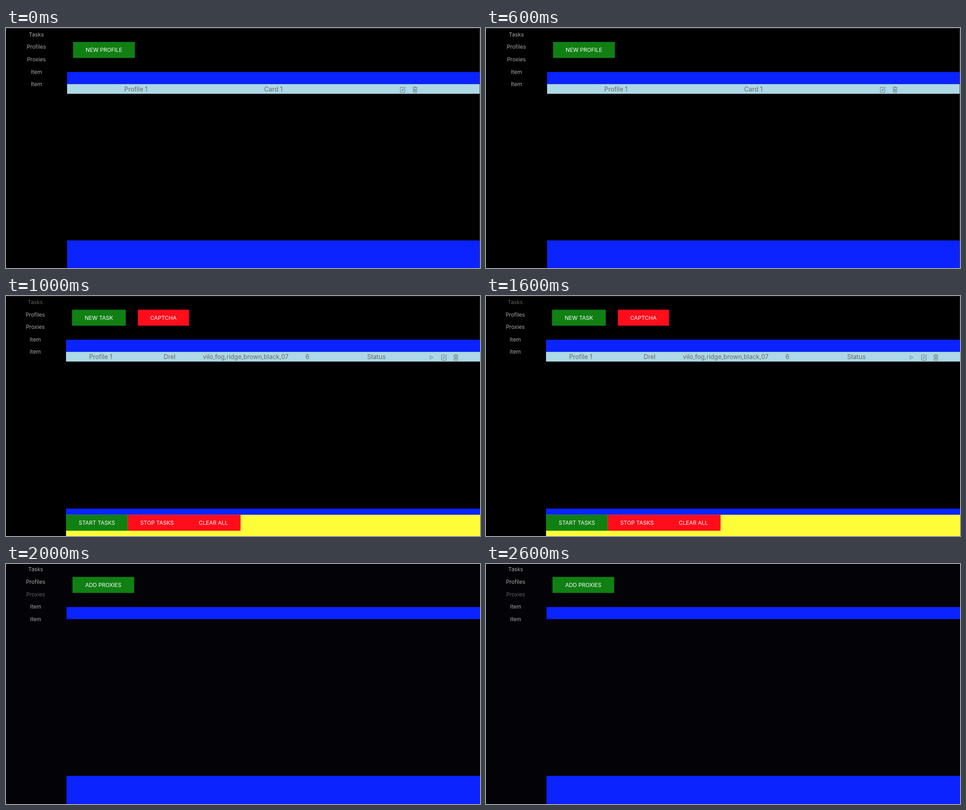
An HTML page that plays this animation: 1050x533 px, repeating every 3000 ms.

```html
<!DOCTYPE html>
<html lang="en">
<head>
<meta charset="utf-8">
<title>Task manager</title>
<style>
  html, body { margin: 0; width: 100%; height: 100%; overflow: hidden; background: #000; }
  svg { display: block; width: 1050px; height: 533px; }
  text { font-family: Inter, "Open Sans", sans-serif; text-anchor: middle; }
  .nav { font-size: 12px; fill: #a9a9a9; }
  .nav .active { fill: #626262; }
  .label { font-size: 12.1px; fill: #fff; }
  .cell { font-size: 13.8px; fill: #666; }
  .blue { fill: #0a23ff; }
  .row { fill: #add8e6; }
  .green { fill: #108013; }
  .red { fill: #ff0d1b; }
  .yellow { fill: #fffc38; }
  .icon { fill: none; stroke: #6c777b; stroke-width: 1; stroke-linejoin: round; }
  .edge { fill: none; stroke: #4a4a4a; }

  #tasks { animation: tasks 3s step-end infinite; }
  #proxies { animation: proxies 3s step-end infinite; }
  @keyframes tasks {
    0%, 66.6667% { visibility: hidden; }
    33.3333% { visibility: visible; }
    100% { visibility: hidden; }
  }
  @keyframes proxies {
    0% { visibility: hidden; }
    66.6667%, 100% { visibility: visible; }
  }
</style>
</head>
<body>
<svg viewBox="0 0 1050 533">
  <defs>
    <g id="edit" class="icon">
      <path d="M8 1.5H.5V13H11V6"/>
      <path d="M4 9.5 4.8 6.8 10.6.8 12.3 2.4 6.5 8.6Z M5 7 6.4 8.4"/>
    </g>
    <g id="trash" class="icon">
      <path d="M0 2.5H11M3.5 2.5V.5H7.5V2.5M1.3 2.5 1.8 13.3H9.2L9.7 2.5M3.8 5V11M5.5 5V11M7.2 5V11"/>
    </g>
    <path id="play" class="icon" d="M.5.5V8L7 4.25Z"/>
  </defs>
  <g id="profiles"></g>
  <g id="tasks"></g>
  <g id="proxies"></g>
</svg>
<script>
  const rect = (cls, x, y, w, h) =>
    `<rect class="${cls}" x="${x}" y="${y}" width="${w}" height="${h}"/>`;
  const text = (cls, x, y, value) =>
    `<text class="${cls}" x="${x}" y="${y}">${value}</text>`;
  const icon = (name, x, y) => `<use href="#${name}" x="${x}" y="${y}"/>`;
  const button = (color, x, y, w, label) =>
    rect(color, x, y, w, 35.5) + text('label', x + w / 2, y + 22.2, label);
  const backdrop = color => `<rect width="1050" height="533" fill="${color}"/>`;

  const nav = (x, y, active) => '<g class="nav">' +
    ['Tasks', 'Profiles', 'Proxies', 'Item', 'Item'].map((item, i) =>
      text(i === active ? 'active' : '', x, y + i * 27.6, item)).join('') + '</g>';

  const show = (id, ...parts) => {
    document.getElementById(id).innerHTML = parts.join('');
  };

  show('profiles',
    backdrop('#000'),
    nav(67.3, 18.8),
    button('green', 148.5, 31, 137, 'NEW PROFILE'),
    rect('blue', 135.3, 97.7, 914, 27),
    rect('row', 135.3, 124.6, 914, 21.5),
    text('cell', 287.8, 140.5, 'Profile 1'),
    text('cell', 592.3, 140.5, 'Card 1'),
    icon('edit', 873, 130),
    icon('trash', 900.5, 130),
    rect('blue', 135.3, 471.7, 914, 62),
    '<path class="edge" d="M0 4Q0 .5 4 .5H1046Q1049.5 .5 1049.5 4V533"/>');

  show('tasks',
    backdrop('#000'),
    nav(64.8, 18, 0),
    button('green', 146.3, 30.4, 119, 'NEW TASK'),
    button('red', 292, 30.4, 113.3, 'CAPTCHA'),
    rect('blue', 133, 97.2, 917, 27),
    rect('row', 133, 124.1, 917, 21.5),
    text('cell', 209.7, 140, 'Profile 1'),
    text('cell', 362.3, 140, 'Drel'),
    text('cell', 531, 140, 'vilo,fog,ridge,brown,black,07'),
    text('cell', 667.8, 140, '6'),
    text('cell', 820.5, 140, 'Status'),
    icon('play', 939, 132),
    icon('edit', 964.2, 129.5),
    icon('trash', 991, 129.5),
    rect('blue', 133, 472.2, 917, 14),
    rect('yellow', 133, 485.8, 917, 48),
    button('green', 133, 485.8, 136.7, 'START TASKS'),
    button('red', 269.7, 485.8, 129.3, 'STOP TASKS'),
    button('red', 399, 485.8, 120.6, 'CLEAR ALL'),
    '<path class="edge" opacity=".5" d="M0 .5H1046Q1049.5 .5 1049.5 4V97"/>');

  show('proxies',
    backdrop('#020207'),
    nav(65.7, 16.3, 2),
    button('green', 147.3, 28.7, 136.5, 'ADD PROXIES'),
    rect('blue', 134, 95.6, 916, 26.8),
    rect('blue', 134, 470.5, 916, 63));
</script>
</body>
</html>
```
